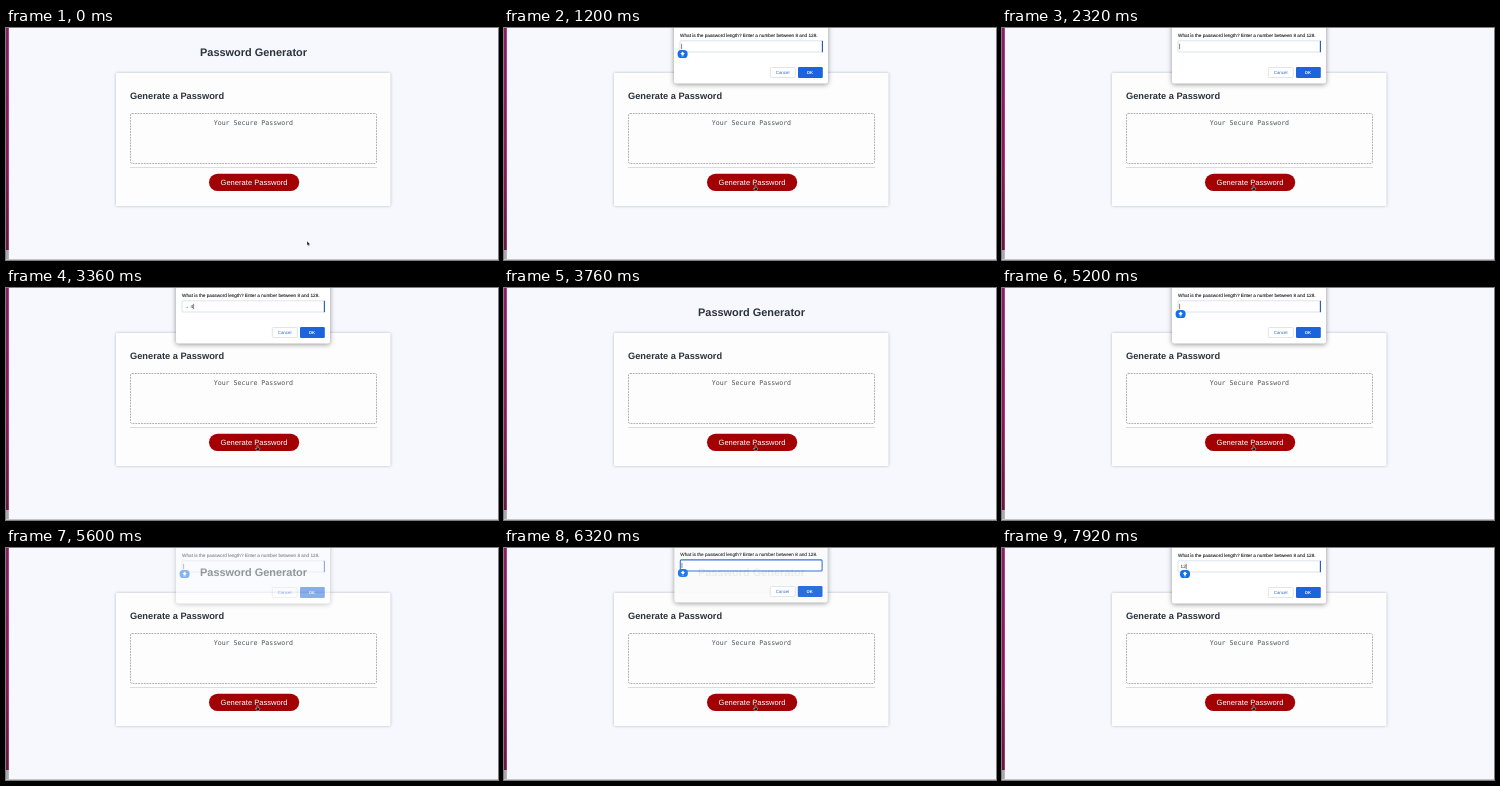
Write an HTML page that moves like this. It is 492 px wide and 232 px high and loops after 8 s.

```html
<!DOCTYPE html>
<html lang="en">
<head>
<meta charset="utf-8">
<title>Password Generator</title>
<style>
  html, body { margin: 0; width: 100%; height: 100%; overflow: hidden; background: #f6f8fd; }
  svg { display: block; width: 492px; height: 232px; }
  text { font-family: "Liberation Sans", Arial, sans-serif; text-rendering: geometricPrecision; }
  .heading { font-weight: bold; fill: #2b333c; }
  .mono { font-family: "DejaVu Sans Mono", monospace; fill: #50555a; }
  .mid { text-anchor: middle; }
  #card { filter: drop-shadow(0 .5px 1.5px rgba(40, 50, 80, .32)); }
  #panel { filter: drop-shadow(0 1px 2.5px rgba(0, 0, 0, .42)); }
</style>
</head>
<body>
<svg viewBox="0 0 492 232">
  <defs>
    <linearGradient id="edge" x2="0" y2="1">
      <stop offset="0" stop-color="#8b1c63"/>
      <stop offset=".6" stop-color="#8c1657"/>
      <stop offset="1" stop-color="#6d1440"/>
    </linearGradient>
  </defs>

  <rect width="492" height="232" fill="#f6f8fd"/>
  <rect width="2.8" height="222" fill="url(#edge)"/>
  <rect y="222" width="2.8" height="10" fill="#a9a6ac"/>
  <rect y="231" width="492" height="1" fill="#c3c5ca"/>

  <text class="heading mid" x="247.5" y="27.6" font-size="10.95">Password Generator</text>
  <rect id="card" x="110" y="45" width="274.5" height="133" rx="1" fill="#fdfdfe"/>
  <text class="heading" x="124" y="71.2" font-size="9.25">Generate a Password</text>
  <rect x="124.5" y="85.5" width="246" height="50" rx="1.5" fill="#fdfdfe"
        stroke="#a4a6a9" stroke-width=".9" stroke-dasharray="1.8 1"/>
  <text class="mono mid" x="247.4" y="97" font-size="6.6">Your Secure Password</text>
  <rect x="124" y="139" width="247" height=".8" fill="#d3d5d9"/>
  <rect x="203" y="145.7" width="90.2" height="17.2" rx="8.6" fill="#a30003"/>
  <text class="mid" x="248" y="157" font-size="7.58" fill="#fff">Generate Password</text>

  <g id="dialog">
    <rect id="panel" x="170" y="-10" width="154" height="65.5" rx="2.5" fill="#fff"/>
    <text x="176" y="8.6" font-size="4.69" fill="#1c1d20" stroke="#1c1d20" stroke-width=".1"
      >What is the password length? Enter a number between 8 and 128.</text>
    <rect id="field" x="176" y="12.8" width="142.4" height="11.2" rx="1"/>
    <path id="side" d="M318.4 12.8v11.4" stroke="#2457b8" stroke-width="1.1"/>
    <text id="value" x="178.6" y="20.3" font-size="4.7" fill="#222" xml:space="preserve"></text>
    <path id="caret" d="M0 15.8v5.4" stroke="#333" stroke-width=".6"/>
    <rect x="266.3" y="39.5" width="25" height="10" rx="1.2" fill="#fff" stroke="#d5d9e0" stroke-width=".7"/>
    <text class="mid" x="278.6" y="46" font-size="4.4" fill="#2866cf">Cancel</text>
    <rect x="294" y="39" width="24.8" height="11" rx="1.2" fill="#1b64de"/>
    <text class="mid" x="306" y="46" font-size="4.2" font-weight="bold" fill="#fff">OK</text>
    <g id="badge">
      <rect x="-5" y="-4" width="10" height="8" rx="3.6" fill="#1470ea"/>
      <path d="M0-2.4L2.3 0H1.1V1H-1.1V0H-2.3ZM-1.1 1.6H1.1V2.3H-1.1Z" fill="#fff"/>
    </g>
  </g>

  <g id="pointer">
    <path id="arrow" d="M0 0V4.6L1.1 3.7L1.9 5.3L2.6 5L1.9 3.4H3.3Z"
          fill="#111" stroke="#fff" stroke-width=".4"/>
    <path id="hand" d="M-.5-2.2Q0-2.8.5-2.2V0L2 .5Q2.4.8 2 2.2L1.5 3.2H-.8L-2.1 1Q-1.6.3-.5 1.2Z"
          fill="#151515" stroke="#fff" stroke-width=".4"/>
  </g>
</svg>

<script>
const LOOP = 8000, STEP = 80;
const $ = id => document.getElementById(id);
const set = (id, attrs) => {
  for (const key in attrs) $(id).setAttribute(key, attrs[key]);
};
const show = (id, on) => $(id).style.display = on ? "" : "none";
const clamp = x => Math.max(0, Math.min(1, x));

// Times in ms; typed holds [time, text], badge holds [time, x or 0 for hidden].
const prompts = [
  { open: 930, close: 3440,
    typed: [[0, ""], [2720, "→"], [3040, "→ 4"]],
    badge: [[0, 178.6], [2240, 0]] },
  { open: 4380, close: 5440, typed: [[0, ""]], badge: [[0, 178.6]] },
  { open: 6173, close: 9000,
    typed: [[0, ""], [7200, "1"], [7680, "12"]],
    badge: [[0, 178.6], [7200, 183]] }
];
const latest = (list, t) => list.filter(([at]) => at <= t).pop()[1];

function drawPrompt(t) {
  const prompt = prompts.find(p => t >= p.open && t < p.close + 320);
  show("dialog", prompt);
  if (!prompt) return;

  const p = clamp((t - prompt.open) / 200);
  const gap = (1 - p) ** 2;
  const fade = 1 - clamp((t - prompt.close) / 320);
  const scale = 1 - .06 * gap;
  const shade = Math.round(255 - 64 * gap);
  set("dialog", {
    opacity: (1 - gap) * fade,
    transform: `translate(${247 * (1 - scale)} ${-12 * gap}) scale(${scale})`
  });
  set("panel", { fill: `rgb(${shade},${shade},${shade})` });
  set("field", {
    fill: p < .6 ? "#dce1e9" : "#fff",
    stroke: p < 1 ? "#2b6bd2" : "#c5d0e2",
    "stroke-width": p < 1 ? 1.1 : .6
  });
  show("side", p === 1);

  const text = latest(prompt.typed, t);
  $("value").textContent = text;
  const end = text ? 179 + $("value").getComputedTextLength() : 177.6;
  set("caret", { transform: `translate(${end} 0)` });

  const x = latest(prompt.badge, t);
  show("badge", x && p > .7);
  set("badge", { transform: `translate(${x} 26)` });
}

function drawPointer(t) {
  const p = clamp((t - 40) / 840);
  const k = p * p * (3 - 2 * p);
  const x = 301 - 49.5 * k, y = 213 - 53.5 * k;
  const over = y < 163;
  set("pointer", { transform: `translate(${x} ${y})` });
  show("hand", over);
  show("arrow", !over);
}

const start = performance.now();
function frame() {
  const t = Math.floor((performance.now() - start) % LOOP / STEP) * STEP;
  drawPrompt(t);
  drawPointer(t);
  requestAnimationFrame(frame);
}
frame();
</script>
</body>
</html>
```
